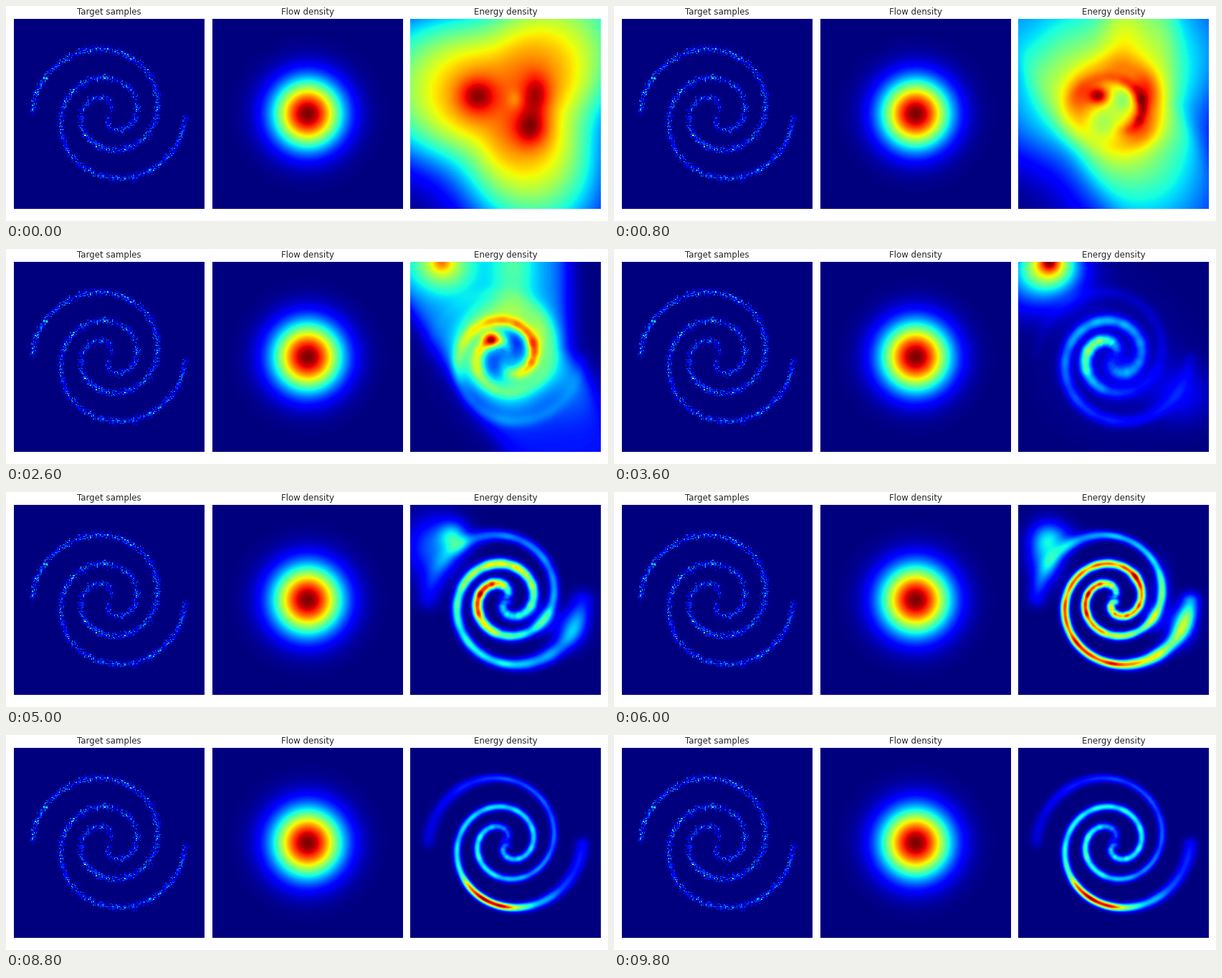
Recreate the animation shown at these times as a matplotlib script. Size 840 px wide and 301 px high, loop 10 s.

```python
import numpy as np
import matplotlib.pyplot as plt
from matplotlib.animation import FuncAnimation

W, H, DPI = 840, 301, 64
PX = 72 / DPI                      # points per pixel
SIDE, LEFT, TOP, PITCH = 266, 11, 17.6, 276.5
N, UNIT, MID = 266, 33.3, 133.0
FRAMES, STEP = 50, 200

plt.rcParams["font.family"] = "DejaVu Sans"
rng = np.random.default_rng(7)
Y, X = np.mgrid[0:N, 0:N] + 0.5


def sigmoid(v):
    return 1 / (1 + np.exp(-v))


def bell(v):
    return np.exp(-v * v / 2)


def blob(x, y, height, sx, sy):
    return height * bell((X - x) / sx) * bell((Y - y) / sy)


def nearest(sign):
    """Squared distance to one arm, and the arm angle closest to each pixel."""
    best, angle = np.full((N, N), 1e9), np.zeros((N, N))
    for t in np.linspace(0, 3 * np.pi, 500):
        px = MID + UNIT * sign * (0.083 - np.cos(t) * t / 3)
        py = MID + UNIT * sign * (0.083 + np.sin(t) * t / 3)
        d = (X - px) ** 2 + (Y - py) ** 2
        closer = d < best
        best[closer], angle[closer] = d[closer], t
    return best, angle


ARMS = {sign: nearest(sign) for sign in (1, -1)}


def ridge(sign, width, base, gain, peak, spread, flare=0):
    """Bright line along an arm: even base, one swell at peak (half turns)."""
    d, t = ARMS[sign]
    u = t / np.pi
    s = width * (1 + flare * np.clip((u - 2.5) * 2, 0, 1))
    level = base + gain * bell((u - peak) / spread)
    level *= 1 - 0.5 * np.exp(-4 * u)                   # faint inner tip
    level *= 0.3 + 0.7 * sigmoid((2.75 - u) * 9)        # faint outer tip
    level *= 1 + 0.06 * np.sin(9 * t) + 0.04 * np.sin(17 * t + 1)
    return level * np.exp(-d / (2 * s * s))


def heart():
    dx, dy = X - 140, Y - 118
    turn = np.arctan2(dy, dx)
    reach = 92 + 18 * np.cos(3 * turn - 3.75) - 6 * np.sin(turn)
    rho = np.hypot(dx, dy) / reach
    return (0.8 * np.exp(-0.22 * rho ** 2.6)
            + blob(93, 108, 0.2, 18, 17) + blob(176, 106, 0.17, 14, 21)
            + blob(168, 153, 0.2, 17, 18) + blob(146, 113, -0.07, 7, 9))


def swirl():
    left = sigmoid((X + 43 - 0.66 * Y) / 10)
    right = sigmoid((218 + 0.6 * np.maximum(Y - 120, 0) - X) / 9)
    v = (0.2 + 0.18 * sigmoid((172 - Y) / 12)) * left * right
    ring = np.hypot(X - 135, Y - 123) - 54
    v += 0.24 * bell(ring / 16)
    v += blob(144, 0, 0.24, 22, 60) + blob(145, 205, 0.1, 36, 20)
    v += blob(15, 35, -0.14, 32, 34)
    v += blob(117, 147, -0.2, 14, 17) + blob(147, 114, -0.24, 13, 16)
    v += blob(113, 108, 0.6, 9, 8) + blob(178, 105, 0.14, 10, 20)
    return v + ridge(1, 6, 0, 0.4, 1.15, 0.33)


def corner_flare():
    return (blob(44, 0, 0.56, 26, 24) + blob(44, 0, 0.24, 9, 9)
            + blob(25, 25, 0.24, 45, 33) + blob(135, 140, 0.06, 55, 55)
            + blob(228, 185, 0.1, 30, 28) + blob(148, 153, 0.1, 14, 12)
            + np.maximum(ridge(1, 6, 0.1, 0.15, 1.6, 0.5),
                         ridge(-1, 6, 0.04, 0.42, 0.85, 0.4)))


def warm_core():
    return (blob(60, 44, 0.26, 14, 14) + blob(33, 60, 0.2, 26, 30)
            + blob(226, 172, 0.15, 15, 18) + blob(186, 160, 0.14, 14, 14)
            + np.maximum(ridge(1, 5, 0.35, 0.25, 1.5, 0.3, 1.2),
                         ridge(-1, 5, 0.24, 0.62, 0.92, 0.4, 1.2)))


def full_spiral():
    return (blob(38, 68, 0.22, 16, 26) + blob(50, 45, 0.14, 20, 14)
            + blob(228, 168, 0.2, 13, 17) + blob(200, 120, 0.1, 9, 25)
            + blob(164, 102, 0.2, 6, 7) + blob(188, 157, 0.16, 9, 12)
            + np.maximum(ridge(1, 4, 0.6, 0.1, 2.45, 0.25, 1.2),
                         ridge(-1, 4, 0.25, 0.45, 1, 0.45, 1.2)))


def bright_base():
    return np.maximum(ridge(1, 3.5, 0.28, 0.7, 2.41, 0.12, 1),
                      ridge(-1, 3.5, 0.2, 0.12, 1.2, 0.4, 1))


def settled():
    return np.maximum(ridge(1, 3.6, 0.35, 0.62, 2.39, 0.12, 0.8),
                      ridge(-1, 3.6, 0.18, 0.22, 1.1, 0.4, 0.8))


# frame at which training reaches each stage
STAGES = {0: heart, 9: swirl, 18: corner_flare, 25: warm_core,
          30: full_spiral, 39: bright_base, 49: settled}
STOPS = list(STAGES)
FIELDS = [np.clip(make(), 0, 1) for make in STAGES.values()]


def energy(i):
    k = min(np.searchsorted(STOPS, i, side="right"), len(STOPS) - 1)
    u = (i - STOPS[k - 1]) / (STOPS[k] - STOPS[k - 1])
    v = (1 - u) * FIELDS[k - 1] + u * FIELDS[k]
    return v / v.max()


def sample_counts(count=4000, bins=200):
    t = np.sqrt(rng.random(count)) * 3 * np.pi
    sign = rng.choice([-1, 1], count)
    x = sign * (rng.random(count) * 0.5 - np.cos(t) * t) / 3
    y = sign * (rng.random(count) * 0.5 + np.sin(t) * t) / 3
    x, y = (v + rng.normal(0, 0.065, count) for v in (x, y))
    return np.histogram2d(y, x, bins=bins, range=[[-4, 4], [-4, 4]])[0]


fig = plt.figure(figsize=(W / DPI, H / DPI), dpi=DPI, facecolor="white")


def panel(i, title, data, top=1, interpolation="bilinear"):
    ax = fig.add_axes([(LEFT + PITCH * i) / W, 1 - (TOP + SIDE) / H,
                       SIDE / W, SIDE / H])
    ax.set_title(title, fontsize=11.8 * PX, pad=5.4 * PX, color="#262626")
    ax.axis("off")
    return ax.imshow(data, cmap="jet", aspect="auto", vmin=0, vmax=top,
                     interpolation=interpolation)


panel(0, "Target samples", sample_counts(), 9, "nearest")
panel(1, "Flow density", blob(MID, MID, 1, UNIT, UNIT))
image = panel(2, "Energy density", energy(0))


def update(i):
    image.set_data(energy(i))
    return [image]


anim = FuncAnimation(fig, update, frames=FRAMES, interval=STEP, repeat=True,
                     repeat_delay=0)
plt.show()
```
